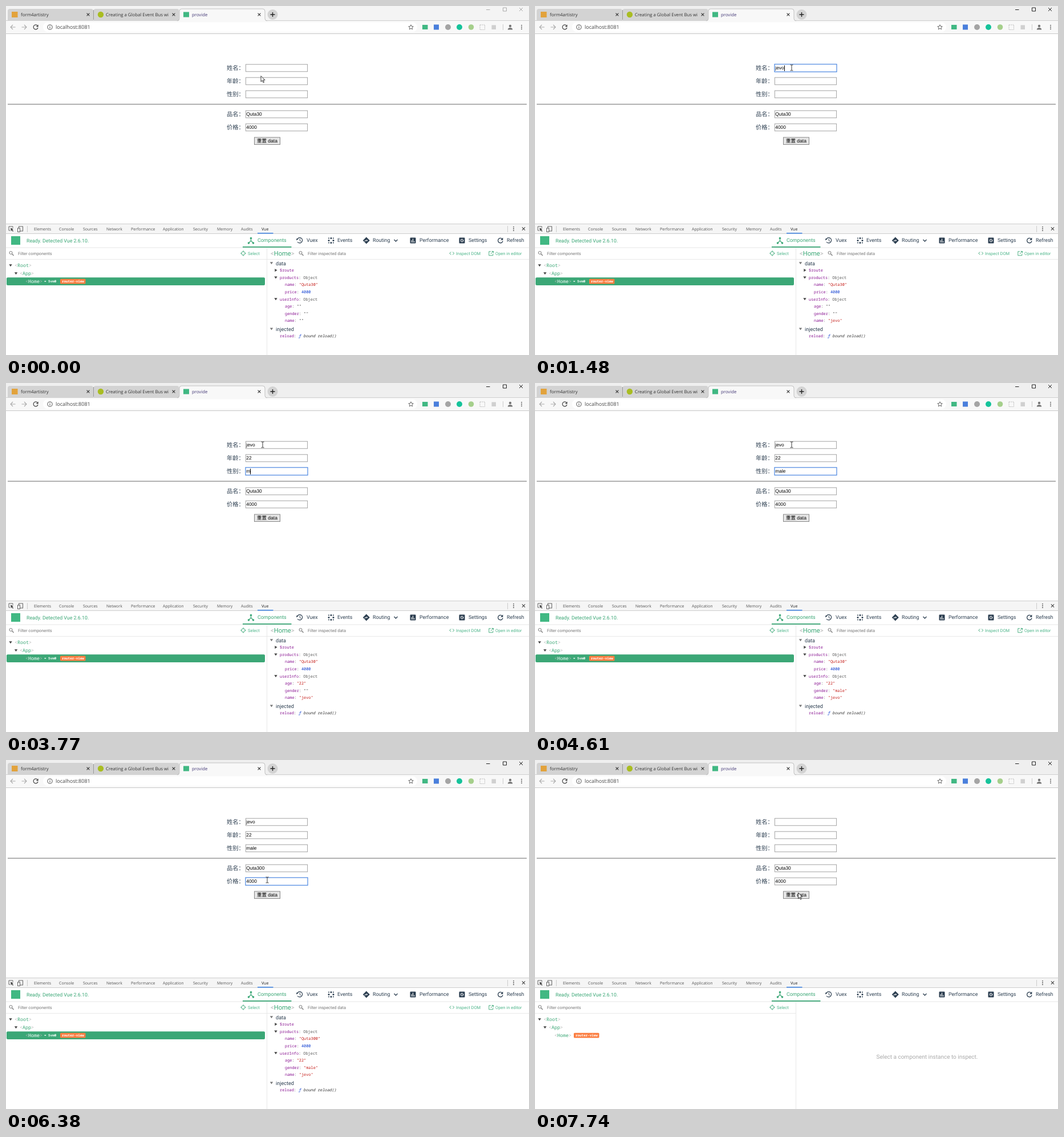
An HTML page for the animation above (8 s loop, 917 by 611 pixels).

```html
<!DOCTYPE html>
<html lang="zh-CN">
<head>
<meta charset="utf-8">
<title>provide</title>
<style>
html, body { margin: 0; width: 100%; height: 100%; overflow: hidden; background: #fff }
svg { display: block }
text { white-space: pre; text-rendering: geometricPrecision }
.ui { font-family: "Open Sans", sans-serif }
.rb { font-family: Roboto, sans-serif }
.ar { font-family: "Liberation Sans", "Noto Sans CJK SC", "Noto Sans CJK", sans-serif }
.cj { font-family: "Noto Sans CJK SC", "Noto Sans CJK", sans-serif }
.mo { font-family: "Noto Sans Mono", monospace }
</style>
</head>
<body>
<svg id="stage" width="917" height="611" viewBox="0 0 917 611"></svg>
<script>
const GREEN = '#3ba776', NAVY = '#2c3e50', KEY = '#881391', STR = '#c41a16', NUM = '#0b3bd0';
const stage = document.getElementById('stage');
const $ = id => document.getElementById(id);
const esc = s => s.replace(/</g, '&lt;');

// Drawing helpers, each returns markup
const text = (font, size, x, y, s, fill, more = '') =>
  `<text class="${font}" font-size="${size}" x="${x}" y="${y}" fill="${fill}" ${more}>${s}</text>`;
const rect = (x, y, w, h, fill, more = '') =>
  `<rect x="${x}" y="${y}" width="${w}" height="${h}" fill="${fill}" ${more}/>`;
const dot = (x, y, r, fill, more = '') =>
  `<circle cx="${x}" cy="${y}" r="${r}" fill="${fill}" ${more}/>`;
const line = (d, color, w = 1, more = '') =>
  `<path d="${d}" fill="none" stroke="${color}" stroke-width="${w}" ${more}/>`;
const fill = (d, color) => `<path d="${d}" fill="${color}"/>`;
const span = (s, color, more = '') => `<tspan fill="${color}" ${more}>${s}</tspan>`;
const cross = (x, y, r, color) =>
  line(`M${x - r} ${y - r}l${2 * r} ${2 * r}m0 ${-2 * r}l${-2 * r} ${2 * r}`, color, 1.1);
const kebab = (x, y) => [-3.2, 0, 3.2].map(d => dot(x, y + d, .9, '#444')).join('');
const lens = (x, y) => dot(x, y, 2.5, 'none', 'stroke="#777"') + line(`M${x + 2} ${y + 2}l3 3`, '#777', 1.2);
const open = (x, y, c = '#444') => fill(`M${x - 2.7} ${y - 1.8}h5.4l-2.7 4z`, c);
const tag = s => span('&lt;', '#b5b5b5') + s + span('>', '#b5b5b5');

const tops = [102, 125, 148, 183, 206];
const labels = ['姓名', '年龄', '性别', '品名', '价格'];

function browser() {
  let s = rect(0, 0, 917, 26, '#efefef', 'id="strip"');
  for (const x of [3, 153.5])
    s += fill(`M${x} 26V9q0-4 4-4h142q4 0 4 4v17z`, '#d3d3d3');
  s += line('M153.5 7v17', '#999') + line('M0 25.5h917', '#cfcfcf');
  s += rect(0, 26, 917, 22, '#f8f8f8') + line('M0 48.5h917', '#c9c9c9');
  s += `<path d="M300 26q4 0 4-4V9q0-4 4-4h142q4 0 4 4v13q0 4 4 4" fill="#f8f8f8" stroke="#b4b4b4" stroke-width=".8"/>`;
  s += rect(10, 10, 10.5, 10, '#e2a23c') + dot(166, 15, 5.2, '#a9bd22') + rect(311, 10.5, 10, 9, '#41b883');
  s += text('ui', 7.9, 26, 18, 'form4artistry', '#333');
  s += `<clipPath id="clip"><path d="M170 5h115v20h-115z"/></clipPath>` +
    text('ui', 7.8, 175, 18, 'Creating a Global Event Bus wi', '#333', 'clip-path="url(#clip)"');
  s += text('ui', 7.8, 326, 18, 'provide', '#453a78');
  for (const x of [144, 294, 444]) s += cross(x, 15, 2.4, '#333');
  s += dot(467.5, 15, 9, '#d3d3d3') + line('M463.5 15h8m-4-4v8', '#222', 1.4);
  s += `<g id="controls" fill="none" stroke-width="1"><path d="M842 6.5h6.5M871.5 3h6v6h-6zM900 3l6 6m0-6l-6 6"/></g>`;
  // Toolbar
  s += line('M16.5 37h-8.5m4-4l-4 4 4 4M27.5 37h8.5m-4-4l4 4-4 4', '#a9a9a9', 1.1);
  s += line('M55.3 34.5a4 4 0 1 0 .7 3.5', '#444', 1.2) + fill('M56.6 32.5v4h-4z', '#444');
  s += rect(65, 28.5, 656, 17, '#fff', 'rx="8.5"');
  s += dot(77, 37, 4.1, 'none', 'stroke="#555"') + line('M77 36.3v3M77 34.4v1', '#555', 1.1);
  s += text('ui', 9, 87, 40, 'localhost:8081', '#444');
  s += line('M710 32.8l1.2 2.8 3 .3-2.3 2 .7 3-2.6-1.6-2.6 1.6.7-3-2.3-2 3-.3z', '#555', .9);
  s += rect(730, 33, 9.5, 8, '#41b883') + rect(750, 32.5, 9, 9, '#4a7fdc') + dot(775, 37, 5, '#a4a4a4') +
    dot(795, 37, 5, '#15c39a') + dot(815.5, 37, 4.8, '#a5cf8b') +
    rect(831, 33, 8.5, 8.5, 'none', 'stroke="#bbb" stroke-dasharray="2 1.2"') + rect(851.5, 33.5, 7.5, 7.5, '#d0d0d0');
  s += line('M871.5 32v10', '#ccc') + dot(884, 35, 2.2, '#777') + fill('M879.8 41.5q0-3.6 4.2-3.6t4.2 3.6z', '#777') + kebab(904, 37);
  return s;
}

function page() {
  let s = line('M3 172h910', '#999', 1.3);
  tops.forEach((y, i) => {
    s += text('cj', 10.3, 387, y + 9.5, labels[i] + '：', NAVY);
    s += `<rect id="box${i}" fill="#fff"/>` + text('ar', 8.35, 421.3, y + 9.2, '', '#000', `id="in${i}"`);
  });
  s += rect(421, 0, 1, 10, '#000', 'id="caret"');
  s += rect(435.5, 230, 45, 12.5, '#e6e6e6', 'stroke="#888"') + text('ar', 8.5, 440, 239.2, '重置 data', '#000');
  return s;
}

function devtools() {
  let s = rect(0, 381, 917, 17.5, '#f5f5f5') + line('M0 381.5h917M0 398.5h917', '#cdcdcd');
  s += line('M12 388.5v-2.5h-7v7h2.5', '#555', .9) + fill('M8 388.5l5 2-2 1 2 2.5-1 1-2-2.5-1 2z', '#444');
  s += rect(22.5, 386, 7, 8, 'none', 'stroke="#555" stroke-width=".9"') + rect(20.5, 389, 4, 6.5, '#f5f5f5', 'stroke="#555" stroke-width=".9"');
  s += line('M37.5 385v11M879.5 385v11', '#ccc');
  [['Elements', 49], ['Console', 93], ['Sources', 135], ['Network', 176], ['Performance', 219], ['Application', 275],
   ['Security', 328], ['Memory', 370], ['Audits', 412], ['Vue', 448]]
    .forEach(([name, x]) => s += text('ui', 7, x, 393, name, name == 'Vue' ? '#222' : '#555'));
  s += rect(441, 397, 27.5, 1.5, '#3f86e8') + kebab(890, 390) + cross(907.5, 390, 2.6, '#444');

  // Extension header
  s += rect(9, 403, 16, 15, '#41b883') + text('rb', 8.8, 36, 414, 'Ready. Detected Vue 2.6.10.', GREEN);
  s += line('M0 423h917', '#e6e6e6') + rect(415, 421, 85.5, 1.8, GREEN);
  [['Components', 441], ['Vuex', 527], ['Events', 581], ['Routing', 643], ['Performance', 725], ['Settings', 811], ['Refresh', 878]]
    .forEach(([name, x], i) => s += text('rb', 8.9, x, 413.3, name, i ? NAVY : GREEN));
  s += line('M429.5 407v4l-4 4m4-4l4 4', GREEN, 1.2) + dot(429.5, 406.5, 1.8, GREEN) + dot(425.5, 415, 1.8, GREEN) + dot(433.5, 415, 1.8, GREEN);
  s += line('M510.8 408a4.7 4.7 0 1 1 .3 5', NAVY, 1.2) + line('M515.3 407.5v3.3l2.2 1.3', NAVY) + fill('M509 407.5h4l-3.5 3z', NAVY);
  for (let i = 0; i < 9; i++)
    if (i != 4) s += dot(566 + i % 3 * 4, 406.5 + (i / 3 | 0) * 4, i % 2 ? 1.5 : 1, NAVY);
  s += fill('M631.8 404.5l6 6-6 6-6-6z', NAVY) + line('M629.5 412.5v-2h4m-1.5-1.7l1.7 1.7-1.7 1.7', '#fff', .9) + line('M680.5 409l3 3 3-3', NAVY, 1.3);
  s += rect(708.5, 405.5, 10, 10, NAVY, 'rx="1.2"') + line('M711.2 414v-4M713.5 414v-6.5M715.8 414v-2.5', '#fff', 1.1);
  s += rect(794.5, 405.5, 10, 10, NAVY, 'rx="1.2"') + dot(799.5, 410.5, 2.1, 'none', 'stroke="#fff" stroke-width="1.5" stroke-dasharray="1.6 .6"');
  s += line('M870 407.8a4.2 4.2 0 1 0 1 3.6', NAVY, 1.3) + fill('M871.4 405.5v4.3h-4.3z', NAVY);

  // Component tree
  s += line('M457.5 423v188M0 443.5h457', '#e8e8e8');
  s += lens(8.5, 432) + text('rb', 7.4, 21, 435.7, 'Filter components', '#777');
  s += dot(416, 433, 3.2, 'none', `stroke="${GREEN}" stroke-width=".8"`) + line('M416 428v3m0 4v3M411 433h3m4 0h3', GREEN, .8);
  s += text('rb', 7.5, 424, 435.7, 'Select', '#4db58a');
  s += open(8, 454) + text('mo', 8.3, 15, 457, tag('Root'), GREEN);
  s += open(17.5, 468) + text('mo', 8.3, 24, 471, tag('App'), GREEN);
  s += rect(1, 475.3, 453, 13.7, GREEN, 'rx="2" class="picked"') + text('mo', 8.3, 34, 485, tag('Home'), GREEN, 'id="home"');
  s += text('mo', 5.9, 67, 484.3, '= $vm0', '#fff', 'font-weight="bold" class="picked"');
  s += `<g id="badge">${rect(0, 477.8, 44.5, 8.8, '#fb7d40', 'rx="1.5"')}${text('mo', 5.9, 3, 484.2, 'router-view', '#fff', 'font-weight="bold"')}</g>`;
  return s + `<g class="picked">${inspector()}</g>` +
    text('rb', 10, 687.5, 522.5, 'Select a component instance to inspect.', '#aaa', 'id="empty" text-anchor="middle"');
}

function inspector() {
  let s = line('M458 443.5h459', '#e8e8e8');
  s += text('rb', 11.2, 464, 436.5, tag('Home'), GREEN) + lens(516.5, 432) + text('rb', 7.4, 529, 435.7, 'Filter inspected data', '#777');
  s += line('M780.5 430.5l-2.8 2.5 2.8 2.5m2.5-5l2.8 2.5-2.8 2.5', GREEN, .9) + text('rb', 7.5, 789, 435.7, 'Inspect DOM', '#4db58a');
  s += line('M850 429.8h-3.2v7h7v-3M851.5 429.5h3v3m0-3l-4.5 4.5', GREEN, .9) + text('rb', 7.5, 858, 435.7, 'Open in editor', '#4db58a');
  s += open(465.5, 450, '#777') + text('rb', 9.1, 473, 453.5, 'data', NAVY) + open(465.5, 565.3, '#777') + text('rb', 9.1, 473, 568.5, 'injected', NAVY);
  const row = (x, y, key, rest) => text('mo', 6.9, x, y, span(key, KEY) + rest, '#555');
  const value = id => `: <tspan id="${id}"></tspan>`;
  s += fill('M471.3 460l4.2 2.6-4.2 2.6z', '#444') + row(480, 465.2, '$route', '');
  s += open(473, 475.2) + row(480, 477.7, 'products', ': Object') + open(473, 513) + row(480, 515.5, 'userInfo', ': Object');
  [['name', 490.3, 3], ['price', 502.8, 4], ['age', 528, 1], ['gender', 540.6, 2], ['name', 553.1, 0]]
    .forEach(([key, y, i]) => s += row(489, y, key, value('val' + i)));
  return s + row(480, 580.2, 'reload', ': ' + span('ƒ', NUM, 'font-style="italic"') + span(' bound reload()', '#333', 'font-style="italic"'));
}

stage.innerHTML = browser() + page() + devtools() +
  dot(0, 0, 6.7, '#f4ee3c', 'id="click" opacity=".8"') +
  `<path id="arrow" d="M0 0v10l2.3-2.2 1.7 3.8 1.6-.7-1.7-3.7h3.2z" fill="#fff" stroke="#222" stroke-width=".9"/>` +
  line('M-2.5-5h1.7l.8.7.8-.7h1.7M0-4.5v9M-2.5 5h1.7l.8-.7.8.7h1.7', '#222', .9, 'id="beam"');

// Typing: [time in the input, time in the inspector, value]
const RESET = 7690, CLEAR = 7740;
const typed = [
  [[0, 0, ''], [1010, 1060, 'j'], [1110, 1200, 'je'], [1250, 1300, 'jev'], [1450, 1480, 'jevo']],
  [[0, 0, ''], [2420, 2470, '2'], [2650, 2650, '22']],
  [[0, 0, ''], [3770, 3820, 'm'], [3900, 3950, 'ma'], [4000, 4050, 'mal'], [4100, 4230, 'male']],
  [[0, 0, 'Quta30'], [5340, 5390, 'Quta300']],
  [[0, 0, '4000'], [6660, 6710, '40000'], [6800, 6850, '400000']]
];
const focus = [[0, -1], [210, 0], [320, 0], [1680, 1], [2980, 2], [5060, 3], [5870, 4], [7600, -1]];
const clicks = [[210, 320], [5010, 5110], [5820, 5920], [7600, CLEAR]];
const path = [[60, 447, 122.5], [200, 450, 108], [4870, 450, 108], [5060, 455, 190], [5500, 455, 190], [5800, 458, 210],
  [6880, 458, 210], [6990, 459, 214], [7180, 459, 214], [7320, 461.5, 232.5]];
const resets = [...focus, ...typed.flat()].map(e => e[0]);

const last = (list, t, col = 0) => list.filter(e => e[col] <= t).pop();

function pointer(t) {
  const i = path.findIndex(p => p[0] > t);
  if (i == 0) return path[0].slice(1);
  if (i < 0) return path[path.length - 1].slice(1);
  const [a, b] = [path[i - 1], path[i]], k = (t - a[0]) / (b[0] - a[0]), e = k * k * (3 - 2 * k);
  return [a[1] + (b[1] - a[1]) * e, a[2] + (b[2] - a[2]) * e];
}

const set = (el, attrs) => { for (const k in attrs) el.setAttribute(k, attrs[k]); };
const show = (el, on) => el.style.display = on ? '' : 'none';

function draw(t) {
  const active = t >= 210, cleared = t >= CLEAR, at = t >= RESET ? 0 : t;
  const field = last(focus, t)[1];
  set($('strip'), { fill: active ? '#efefef' : '#f4f4f4' });
  set($('controls'), { stroke: active ? '#222' : '#aaa' });

  tops.forEach((y, i) => {
    $('in' + i).textContent = last(typed[i], at)[2];
    set($('box' + i), i == field
      ? { x: 420, y: y - .1, width: 109, height: 13.4, stroke: '#4a86e0', 'stroke-width': 1.2 }
      : { x: 420.4, y: y + .2, width: 108.2, height: 12.6, stroke: '#a3a3a3', 'stroke-width': 1 });
    const v = last(typed[i], at, 1)[2], num = v == '4000';
    $('val' + i).textContent = num ? v : `"${v}"`;
    set($('val' + i), { fill: num ? NUM : v ? STR : '#444' });
  });

  const since = t - Math.max(...resets.filter(r => r <= t));
  show($('caret'), field >= 0 && since % 1020 < 510);
  if (field >= 0)
    set($('caret'), { x: Math.round(421.3 + $('in' + field).getComputedTextLength()), y: tops[field] + 2 });

  document.querySelectorAll('.picked').forEach(el => show(el, !cleared));
  show($('empty'), cleared);
  set($('home'), { fill: cleared ? GREEN : '#fff' });
  set($('badge'), { transform: `translate(${cleared ? 68 : 95} 0)` });

  const [x, y] = pointer(t), place = { transform: `translate(${x} ${y})` };
  const over = tops.some(top => y >= top && y <= top + 14);
  set($('arrow'), place);
  set($('beam'), place);
  set($('click'), place);
  show($('arrow'), !over);
  show($('beam'), over);
  show($('click'), clicks.some(([a, b]) => t >= a && t < b));
}

const start = performance.now();
function tick(now) {
  draw(Math.max(0, now - start) % 8000);
  requestAnimationFrame(tick);
}
draw(0);
requestAnimationFrame(tick);
</script>
</body>
</html>
```
